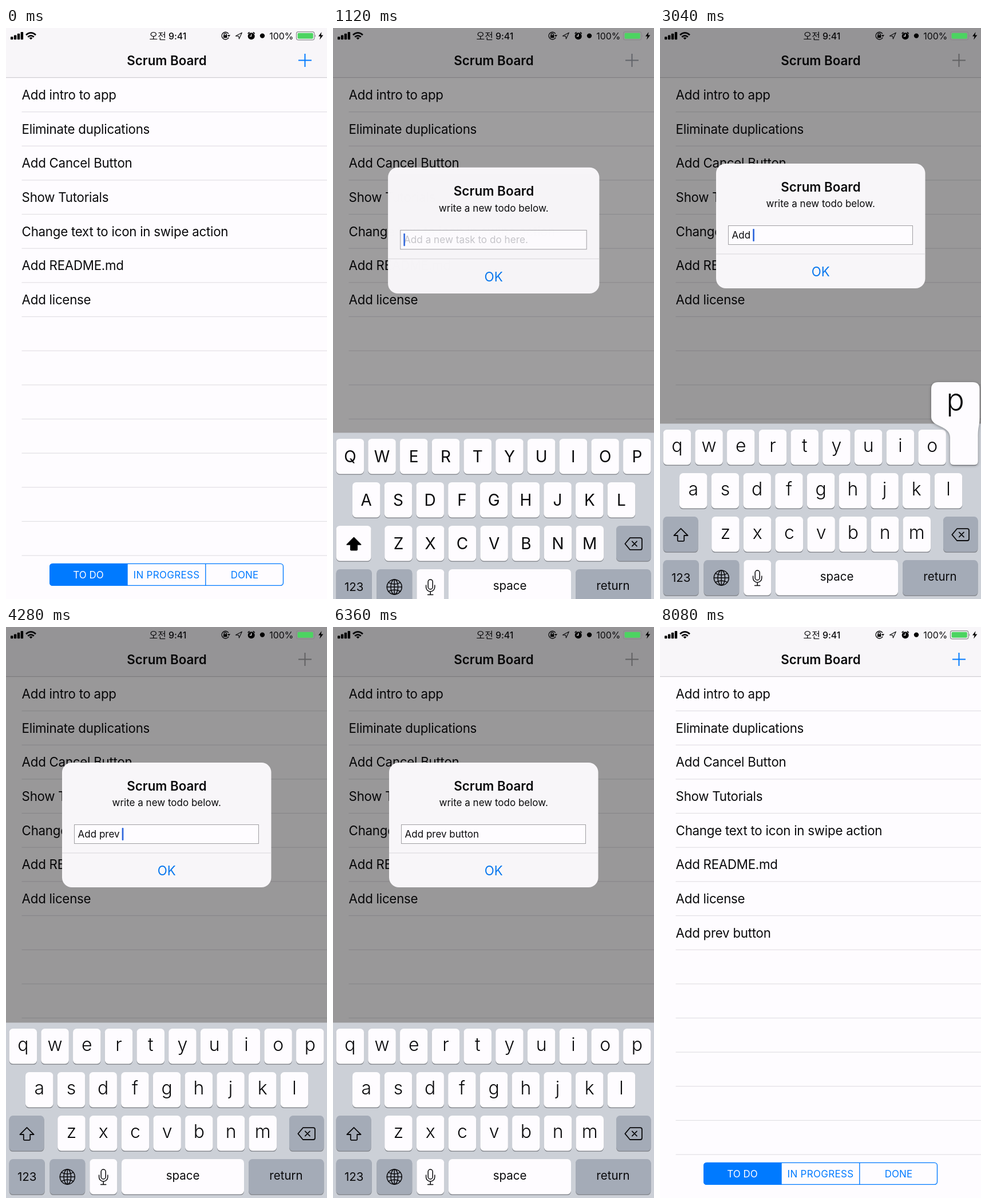
Recreate the animation shown at these times as an HTML page. Size 561 by 998 pixels, loop 8.2 s.

```html
<!DOCTYPE html>
<html lang="en">
<head>
<meta charset="utf-8">
<title>Scrum Board</title>
<style>
html, body { margin: 0; width: 100%; height: 100%; overflow: hidden; background: #fefcff; }
svg { display: block; width: 561px; height: 998px; }
text { font-family: Inter, "Noto Sans CJK KR", "Noto Sans CJK", sans-serif; white-space: pre; fill: #0a0a0c; }
.mid { text-anchor: middle; }
.body { font-size: 22.3px; letter-spacing: -.011em; }
.title { font-size: 22.3px; font-weight: 600; }
.small { font-size: 17px; }
.status { font-size: 15.9px; font-weight: 500; }
.label { font-size: 20.5px; }
.tint { fill: currentColor; }
.line { fill: none; stroke: #0a0a0c; stroke-width: 1.8; stroke-linejoin: round; stroke-linecap: round; }
#bubble { filter: drop-shadow(0 1px 2.5px rgba(0, 0, 0, .38)); }
</style>
</head>
<body>
<svg id="stage" viewBox="0 0 561 998">
  <rect width="561" height="998" fill="#fefcff"/>
  <g id="list"></g>
  <rect width="561" height="86" fill="#f8f6f9"/>
  <rect y="86" width="561" height="1.2" fill="#cfcdd1"/>
  <text class="title mid" x="281" y="65">Scrum Board</text>
  <g id="tinted">
    <path id="plus" d="M511 56.5H534M522.5 45V68" stroke="currentColor" stroke-width="2"/>
    <rect x="76.7" y="936.4" width="407.8" height="38" rx="4.8" fill="none" stroke="currentColor" stroke-width="1.36"/>
    <path class="tint" d="M212.7 936V975H82q-6 0-6-6V942q0-6 6-6Z"/>
    <path d="M348.8 936.4V974.4" stroke="currentColor" stroke-width="1.36"/>
    <text class="small mid" x="144" y="961.5" style="fill:#fefcff">TO DO</text>
    <text class="small mid tint" x="280.5" y="961.5" letter-spacing=".3">IN PROGRESS</text>
    <text class="small mid tint" x="417" y="961.5">DONE</text>
  </g>
  <rect id="dim" width="561" height="998" fill="#000" opacity="0"/>

  <g id="statusBar">
    <text class="status mid" x="283" y="19.6">오전 9:41</text>
    <text class="status" x="460.3" y="19.6" style="font-weight:400">100%</text>
    <g fill="none" stroke="#0a0a0c" stroke-width="2.8">
      <path d="M35 12.2Q43.5 4.6 52 12.2M38.2 15.7Q43.5 11 48.8 15.7"/>
    </g>
    <path d="M40.6 17.4Q43.5 15.2 46.4 17.4L43.5 20.3Z"/>
    <g fill="none" stroke="#0a0a0c" stroke-width="1.4">
      <path d="M388.8 10A6.4 6.4 0 1 0 389.2 16.6"/>
      <path d="M381.2 13V11.4a2 2 0 0 1 4 0V13"/>
      <path d="M401.4 14L412.3 8.2L407.4 19L406.6 14.4Z" stroke-linejoin="round" stroke-width="1.1"/>
    </g>
    <path d="M380 12.6h6.4v4.6H380ZM386.8 12.2h5.4l-2.7 3.4Z"/>
    <circle cx="428.7" cy="14.2" r="6"/>
    <path d="M423.2 9.4L425 7.8M434.2 9.4L432.4 7.8" stroke="#0a0a0c" stroke-width="1.8" stroke-linecap="round"/>
    <path d="M428.7 10.4V14.3H425.8" fill="none" stroke="#f8f6f9" stroke-width="1.2"/>
    <circle cx="448" cy="13.6" r="4.2"/>
    <rect x="507.5" y="6.6" width="31.4" height="14.2" rx="3.4" fill="none" stroke="#8b8a8d" stroke-width="1.2"/>
    <rect x="509.6" y="8.7" width="27.2" height="10" rx="1.8" fill="#4cd461"/>
    <path d="M540.2 11.2q2.2 2.5 0 5Z" fill="#8b8a8d"/>
    <path d="M551.6 7L546 14.6H549.6L548.2 20.6L554.4 12.6H550.6Z"/>
  </g>

  <g id="alert" opacity="0">
    <rect x="98" y="237" width="365.5" height="218" rx="17" fill="#f8f6f9"/>
    <text class="title mid" x="281" y="286">Scrum Board</text>
    <text class="small mid" x="280.7" y="313">write a new todo below.</text>
    <rect x="119.5" y="345.5" width="322" height="33" fill="#fefcff" stroke="#a09fa3"/>
    <text id="hint" class="small" x="125.6" y="368" style="fill:#c6c5ca">Add a new task to do here.</text>
    <text id="typed" class="small" x="125.6" y="368"></text>
    <rect id="caret" y="351" width="2.7" height="22" rx="1.2" fill="#2f66dc"/>
    <rect x="98" y="394.5" width="365.5" height="1" fill="#dad8dc"/>
    <text class="body mid" x="280.7" y="434" style="fill:#0a78ee;letter-spacing:0">OK</text>
  </g>

  <g id="keyboard">
    <rect y="691.5" width="561" height="310" fill="#ccd0d7"/>
    <g id="keys"></g>
    <path id="shift" class="line" d="M36.5 874.8L48.6 887H42.2V895.6q0 1.2-1.2 1.2H32q-1.2 0-1.2-1.2V887H24.4Z"/>
    <path class="line" d="M519 875.2H537q3 0 3 3V893q0 3-3 3H519L510.4 885.6ZM522.8 881.4L531 889.6M531 881.4L522.8 889.6"/>
    <g class="line" style="stroke-width:1.5">
      <circle cx="107.3" cy="961" r="13"/>
      <ellipse cx="107.3" cy="961" rx="6.3" ry="13"/>
      <path d="M107.3 948V974M94.3 961H120.3M97 953.4Q107.3 958.6 117.6 953.4M97 968.6Q107.3 963.4 117.6 968.6"/>
      <rect x="166.2" y="948" width="8" height="17" rx="4"/>
      <path d="M162.6 958V961.4a7.6 7.6 0 0 0 15.2 0V958M170.2 969V974.6M165.6 974.6H174.8"/>
    </g>
    <text class="label mid" x="36.7" y="968">123</text>
    <text class="label mid" x="309" y="966">space</text>
    <text class="label mid" x="489.5" y="966">return</text>
    <g id="popup" visibility="hidden">
      <path id="bubble" fill="#fefcff"/>
      <text id="bubbleText" class="mid"></text>
    </g>
  </g>
</svg>
<script>
const LOOP = 8200, OPEN = 886, CLOSE = 6370;
const $ = id => document.getElementById(id);
const clamp = (v, lo = 0, hi = 1) => Math.min(hi, Math.max(lo, v));

function add(parent, tag, attrs, text) {
  const node = document.createElementNS('http://www.w3.org/2000/svg', tag);
  for (const k in attrs) node.setAttribute(k, attrs[k]);
  if (text) node.textContent = text;
  parent.appendChild(node);
  return node;
}
const set = (id, name, value) => $(id).setAttribute(name, value);

// Task list
const tasks = ['Add intro to app', 'Eliminate duplications', 'Add Cancel Button', 'Show Tutorials',
  'Change text to icon in swipe action', 'Add README.md', 'Add license', 'Add prev button'];
const ROW = 59.65;
for (let i = 0; i < 14; i++)
  add($('list'), 'rect', { x: 27.5, y: 146 + ROW * i, width: 534, height: 1.2, fill: '#e2e0e4' });
const rows = tasks.map((name, i) =>
  add($('list'), 'text', { class: 'body', x: 27.6, y: 125 + ROW * i }, name));
const newRow = rows[rows.length - 1];

for (let i = 0; i < 4; i++) {
  const h = 5 + 2.7 * i;
  add($('statusBar'), 'rect', { x: 8 + 5.9 * i, y: 20.2 - h, width: 4.4, height: h, rx: 1 });
}

// Keyboard
const WHITE = '#fefcff', GREY = '#a4abb7', KEY_W = 48.5, KEY_H = 61.5, PITCH = 55.72;
const keys = {};
function cap(x, y, w, fill) {
  add($('keys'), 'rect', { x, y: y + 1.6, width: w, height: KEY_H, rx: 6.5, fill: '#898c92' });
  return add($('keys'), 'rect', { x, y, width: w, height: KEY_H, rx: 6.5, fill });
}
[['qwertyuiop', 5.6, 702], ['asdfghjkl', 34, 778], ['zxcvbnm', 90.2, 854]].forEach(([letters, x0, y]) => {
  [...letters].forEach((c, i) => {
    const x = x0 + PITCH * i;
    cap(x, y, KEY_W, WHITE);
    keys[c] = { x, y, label: add($('keys'), 'text', { class: 'mid', x: x + KEY_W / 2 }) };
  });
});
const shiftCap = cap(5.6, 854, 61, GREY);
cap(495, 854, 60.5, GREY);
cap(5.6, 930, 62.2, GREY);
cap(76.5, 930, 61.8, GREY);
cap(146.3, 930, 48, WHITE);
const spaceCap = cap(202, 930, 214, WHITE);
cap(424, 930, 131.5, GREY);

let caseNow = null;
function setCase(upper) {
  if (upper === caseNow) return;
  caseNow = upper;
  for (const c in keys) {
    const { label, y } = keys[c];
    label.textContent = upper ? c.toUpperCase() : c;
    label.setAttribute('y', y + (upper ? 41.2 : 38.6));
    label.setAttribute('font-size', upper ? 28 : 32);
    label.setAttribute('font-weight', upper ? 400 : 300);
  }
  shiftCap.setAttribute('fill', upper ? WHITE : GREY);
  $('shift').style.fill = upper ? '#000' : 'none';
}

function showPopup(c) {
  set('popup', 'visibility', c ? 'visible' : 'hidden');
  if (!c) return;
  const { x, y } = keys[c.toLowerCase()];
  const left = clamp(x - 18, 3, 474), right = left + 84.5, top = y - 83, end = x + KEY_W;
  set('bubble', 'd', `M${left + 12} ${top}H${right - 12}q12 0 12 12V${y - 22}` +
    `C${right} ${y - 4} ${end} ${y - 8} ${end} ${y + 14}V${y + 55.5}q0 6-6 6H${x + 6}q-6 0-6-6V${y + 14}` +
    `C${x} ${y - 8} ${left} ${y - 4} ${left} ${y - 22}V${top + 12}q0-12 12-12Z`);
  const label = $('bubbleText'), upper = c !== c.toLowerCase();
  label.textContent = c;
  label.setAttribute('x', (left + right) / 2);
  label.setAttribute('y', y - (upper ? 29 : 34));
  label.setAttribute('font-size', upper ? 48 : 52);
  label.setAttribute('font-weight', 300);
}

// Typing: each character appears when its key is released
const phrase = 'Add prev button';
const downs = [1680, 2200, 2440, 2680, 2960, 3240, 3560, 3840, 4120, 4480, 4720, 4960, 5120, 5320, 5560];
const ups = downs.map((d, i) => d + (i ? 120 : 240));

const pen = document.createElement('canvas').getContext('2d');
function textWidth(s) {
  pen.font = '17px Inter, sans-serif';
  return pen.measureText(s).width;
}

// Critically damped spring from 0 to 1
function spring(ms) {
  const x = Math.max(0, ms) * .02;
  return 1 - (1 + x) * Math.exp(-x);
}
const mix = (a, b, p) => Math.round(a + (b - a) * p);

function draw(t) {
  const opening = spring(t - OPEN), p = opening * (1 - spring(t - CLOSE));
  set('dim', 'opacity', .4 * p);
  $('tinted').style.color = `rgb(${mix(0, 162, p)},${mix(122, 161, p)},${mix(255, 164, p)})`;
  const pressed = t >= 760 && t < 960;
  set('plus', 'opacity', pressed ? .3 + .7 * clamp((t - 860) / 100) : 1);

  const rest = 1 - opening;
  set('alert', 'opacity', 1 - (1 - p) ** 1.5);
  set('alert', 'transform', `translate(281 ${346 + 153 * rest}) scale(${1 + .2 * rest}) translate(-281 -346)`);
  set('keyboard', 'transform', `translate(0 ${307 * (1 - p)})`);
  setCase(t >= 1120 && t < 1940);

  const count = ups.filter(u => t >= u).length;
  const typed = phrase.slice(0, count);
  $('typed').textContent = typed;
  set('hint', 'visibility', count ? 'hidden' : 'visible');
  set('caret', 'x', 124.9 + textWidth(typed));
  set('caret', 'opacity', opening * (1 - clamp((t - 6000) / 180)));

  const held = downs.findIndex((d, i) => t >= d && t < ups[i]);
  const c = held < 0 ? '' : phrase[held];
  showPopup(c.trim());
  spaceCap.setAttribute('fill', c === ' ' ? GREY : WHITE);

  newRow.setAttribute('opacity', clamp((t - 6840) / 240));
}

function tick() {
  draw(performance.now() % LOOP);
  requestAnimationFrame(tick);
}
tick();
</script>
</body>
</html>
```
